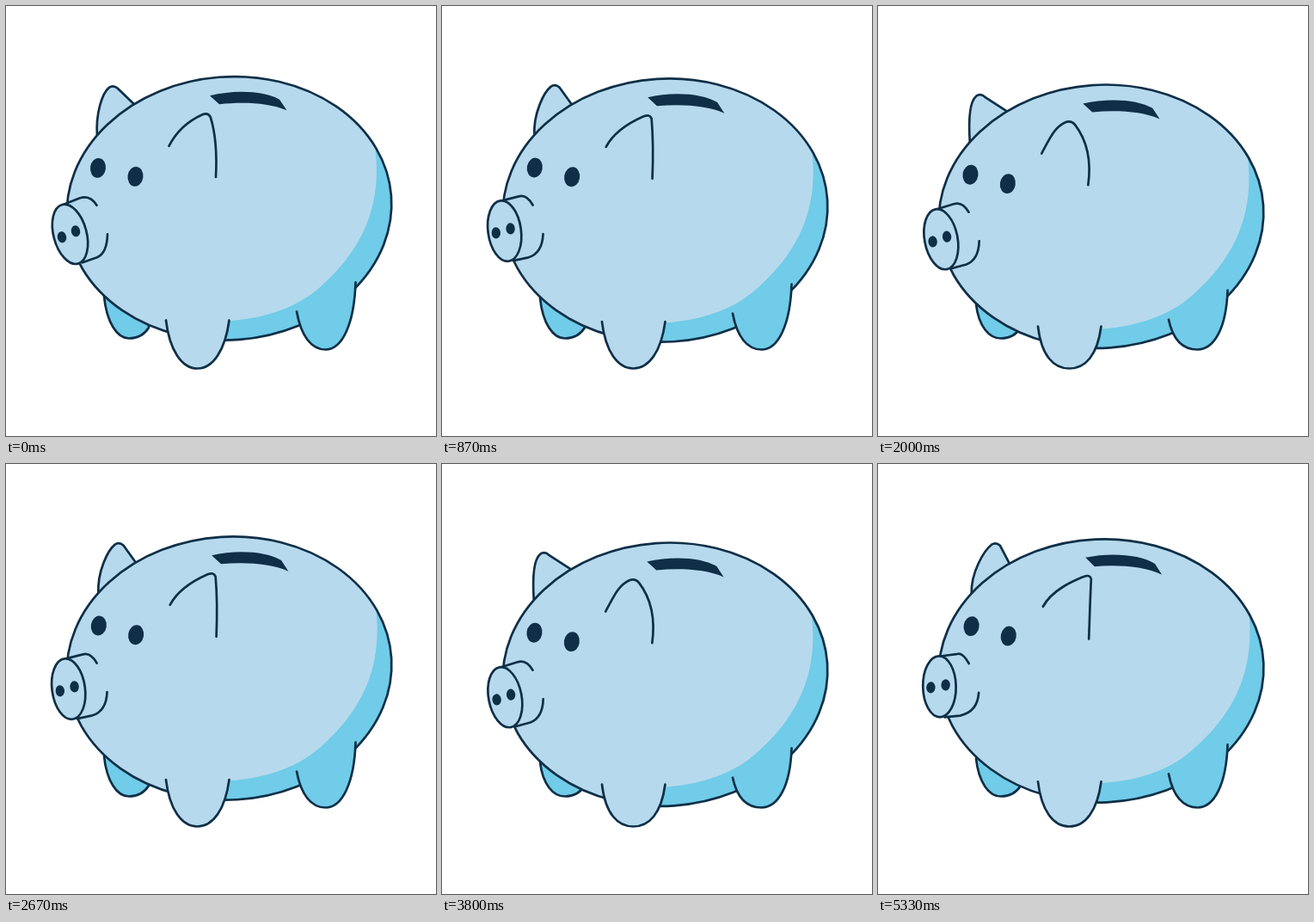
Recreate the animation shown at these times as an HTML page. Size 500 by 500 pixels, loop 5.39 s.

```html
<!DOCTYPE html>
<html lang="en">
<head>
<meta charset="utf-8">
<title>Piggy bank</title>
<style>
  html, body { margin: 0; width: 100%; height: 100%; overflow: hidden; background: #fff; }
  svg { display: block; width: 100%; height: 100%; }
  .line { stroke: #0f2f47; stroke-width: 2.7; stroke-linecap: round; stroke-linejoin: round; }
  .skin { fill: #b7d9ed; }
  .shade { fill: #70cce8; }
  .ink { fill: #0f2f47; }
  .open { fill: none; }
</style>
</head>
<body>
<svg viewBox="0 0 500 500">
  <defs>
    <ellipse id="round" cx="259.5" cy="236" rx="189" ry="153" transform="rotate(-4.5 259.5 236)"/>
    <clipPath id="belly"><use href="#round"/></clipPath>
  </defs>
  <path id="farLeg" class="line shade"/>
  <g id="body">
    <path id="farEar" class="line skin"/>
    <use href="#round" class="skin"/>
    <path class="shade" clip-path="url(#belly)"
      d="M428.5 160C438 225 420 278 367 326C338 353 294 367 240 368V420H470V160Z"/>
    <use href="#round" class="line open"/>
    <path class="ink" d="M237 105C265 98 300 99 318 109.5L326.5 122C305 113 275 112 248 115Z"/>
    <ellipse class="ink" cx="107" cy="189" rx="9" ry="11.5" transform="rotate(8 107 189)"/>
    <ellipse class="ink" cx="150.5" cy="199" rx="9" ry="11.5" transform="rotate(8 150.5 199)"/>
    <path id="nearEar" class="line open"/>
    <path id="cheeks" class="skin"/>
    <path id="folds" class="line open"/>
    <g id="snout">
      <ellipse class="line skin" cx="74.5" cy="266" rx="19.2" ry="35.5" transform="rotate(-15 74.5 266)"/>
      <ellipse class="ink" cx="65" cy="269.5" rx="5.2" ry="6.6" transform="rotate(-10 65 269.5)"/>
      <ellipse class="ink" cx="81" cy="262.5" rx="5.2" ry="6.6" transform="rotate(-10 81 262.5)"/>
    </g>
  </g>
  <path id="frontLeg" class="line skin"/>
  <path id="rearLeg" class="line shade"/>
</svg>
<script>
const LOOP = 5390, STEP = 200 / 3, BEAT = 450;
const PIVOT = { x: 100, y: 252 };
const el = id => document.getElementById(id);
const draw = (id, d) => el(id).setAttribute('d', d);
const move = (id, how) => el(id).setAttribute('transform', how);

// One bob per beat; each part peaks a little later than the one it hangs on.
const wave = (t, peak) => Math.cos(2 * Math.PI * (t - peak) / BEAT);

function spin(x, y, deg) {
  const a = deg * Math.PI / 180, dx = x - PIVOT.x, dy = y - PIVOT.y;
  return [PIVOT.x + dx * Math.cos(a) - dy * Math.sin(a),
          PIVOT.y + dx * Math.sin(a) + dy * Math.cos(a)].join(' ');
}

function drawEars(t) {
  const far = wave(t, 124), near = wave(t, 135);
  let x = 123.1 - 10.6 * far, y = 92.5 + 2.9 * far;
  draw('farEar', `M106 152C104 126 ${x - 13} ${y + 10} ${x - 5} ${y + 3.5}
    Q${x} ${y} ${x + 5} ${y + 4.5}L149 115`);

  x = 231 - 12.5 * near;
  y = 124.2;
  draw('nearEar', `M189.5 163.5C200 143 ${x - 18} ${y + 8} ${x - 7} ${y + 3}
    Q${x} ${y} ${x + 3.5 + 2 * near} ${y + 5.5}C244 150 ${246 + 2 * near} 174 244 199.5`);
}

function drawSnout(nod) {
  const tilt = -13.6 * nod;
  const at = (x, y) => spin(x, y, tilt);
  const upper = `${at(67, 231.5)}L${at(86, 224)}Q98 220 105.5 232.5`;
  const lower = `Q117.5 288 ${at(106, 293)}L${at(89, 299)}`;
  move('snout', `rotate(${tilt} ${PIVOT.x} ${PIVOT.y})`);
  draw('cheeks', `M${upper}L118 266${lower}Z`);
  draw('folds', `M${upper}M118 266${lower}`);
}

function drawLegs(dy) {
  const hip = 366 + 0.75 * dy, knee = dy / 2;
  draw('frontLeg', `M186 ${hip}C190 ${hip + 34} 204 421.5 222.5 421.5
    C241 421.5 255 ${hip + 34} 259.5 ${hip}`);
  draw('rearLeg', `M338 ${356 + dy}C343 ${384 + knee} 355 399.5 371.5 399.5
    C391 399.5 405 ${370 + knee} 406.5 ${322 + dy}`);
  draw('farLeg', `M114 ${338 + dy}C117 ${368 + knee} 129 386.5 143 386.5
    C153 386.5 161 382 166 374V340`);
}

function pose(t) {
  const dy = 4.8 - 6.6 * wave(t, 42);
  const nod = wave(t, 90) - 0.31;
  move('body', `translate(0 ${dy}) rotate(${-2.06 * nod} 259.5 236.5)`);
  drawEars(t);
  drawSnout(nod);
  drawLegs(dy);
}

// The picture changes 15 times a second, on whole hundredths.
const startOf = i => Math.round(i * STEP / 10) * 10;
const begin = performance.now();

function tick() {
  const t = (performance.now() - begin) % LOOP;
  let i = Math.floor((t + 4) / STEP);
  if (startOf(i) > t) i--;
  pose(i * STEP);
  requestAnimationFrame(tick);
}
tick();
</script>
</body>
</html>
```
